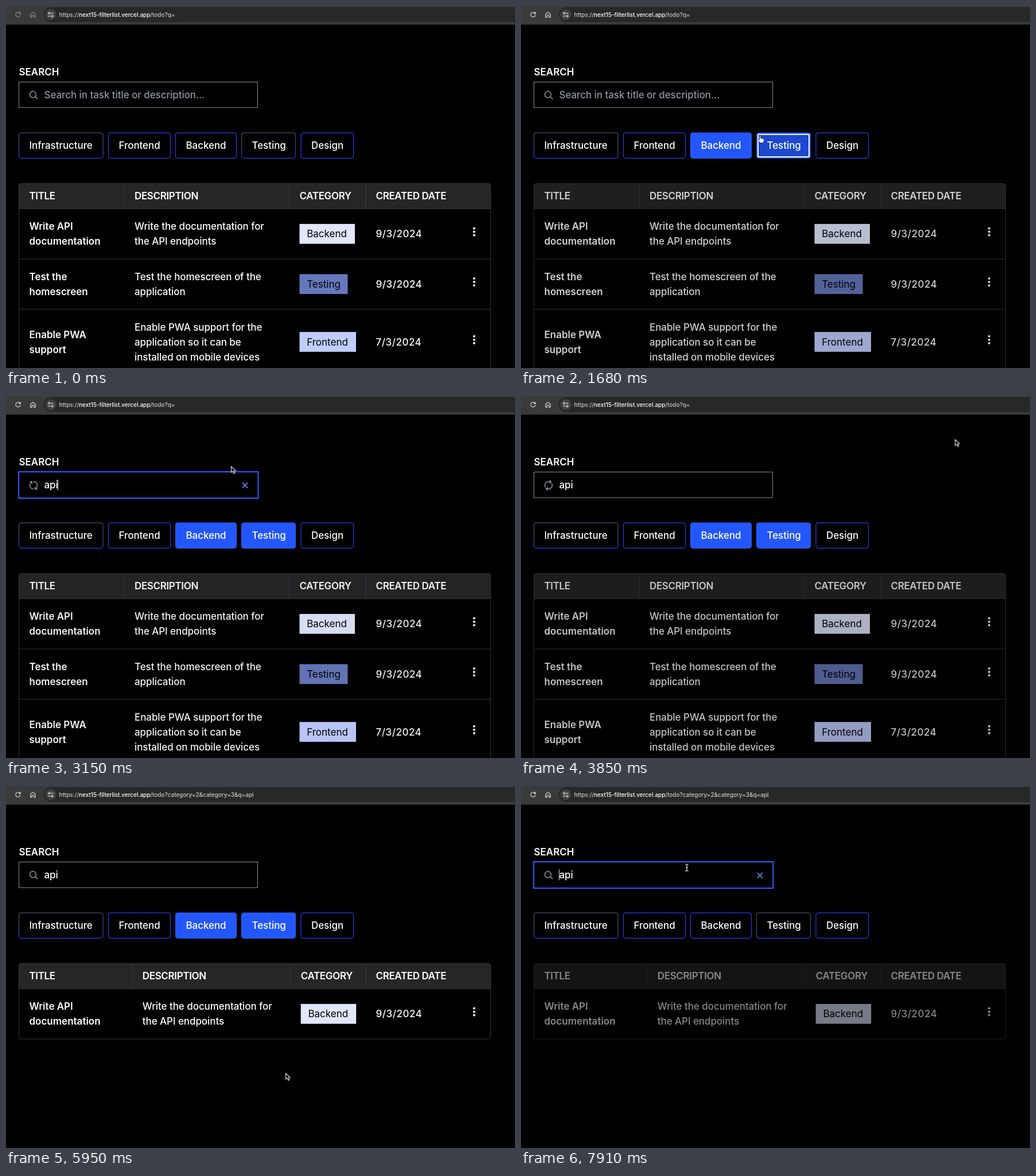
An HTML page for the animation above (8 s loop, 887x631 px).

```html
<!DOCTYPE html>
<html lang="en">
<head>
<meta charset="utf-8">
<title>Task list filter</title>
<style>
  html, body { margin: 0; width: 100%; height: 100%; overflow: hidden; background: #000; }
  svg { display: block; position: absolute; left: 0; top: 0; }
  text { font: 450 17px Inter, "Open Sans", sans-serif; letter-spacing: -.07px; fill: #fff; white-space: pre; }
  .bold { font-weight: 600; letter-spacing: 0; }
  .head { font-weight: 600; letter-spacing: -.35px; }
  .date { letter-spacing: .5px; }
  .dark { font-weight: 400; letter-spacing: 0; fill: #000; }
  .hint { fill: #8d96a3; }
  .url { font-size: 9.95px; letter-spacing: 0; fill: #c9c9c9; }
  .host { fill: #fff; font-weight: 500; }
  .line { fill: none; stroke-linecap: round; stroke-linejoin: round; }
</style>
</head>
<body>
<svg id="stage" width="887" height="631" viewBox="0 0 887 631"></svg>
<script>
const LOOP = 8000, FRAME = 70;
const BLUE = '#2457fb', BLUE_DARK = '#1d48d0', GRAY = '#374151';
const EDGE = '#2a3df0', EDGE_FADE = 'url(#fade)';

const text = (x, y, s, cls = '') => `<text x="${x}" y="${y}" class="${cls}">${s}</text>`;
const lines = (x, y, list, cls) => list.map((s, i) => text(x, y + i * 26, s, cls)).join('');
const rect = (x, y, w, h, attrs) => `<rect x="${x}" y="${y}" width="${w}" height="${h}" ${attrs}/>`;
const path = (d, attrs) => `<path d="${d}" class="line" ${attrs}/>`;

// label, left, width, border colour
const buttons = [
  ['Infrastructure', 22.5, 146.5, EDGE_FADE],
  ['Frontend', 178.5, 108, EDGE],
  ['Backend', 295.5, 106, EDGE],
  ['Testing', 410.5, 94, EDGE_FADE],
  ['Design', 514, 91.5, EDGE]
];
const BACKEND = 2, TESTING = 3;

const tasks = [
  { mid: 397, title: ['Write API', 'documentation'], about: ['Write the documentation for', 'the API endpoints'],
    tag: 'Backend', w: 96.5, fill: '#e0e7ff', date: '9/3/2024' },
  { mid: 484.5, title: ['Test the', 'homescreen'], about: ['Test the homescreen of the', 'application'],
    tag: 'Testing', w: 84, fill: '#6678bb', date: '9/3/2024' },
  { mid: 585.3, title: ['Enable PWA', 'support'],
    about: ['Enable PWA support for the', 'application so it can be', 'installed on mobile devices'],
    tag: 'Frontend', w: 98.5, fill: '#c0cdff', date: '7/3/2024' }
];

function taskRow(r, colAbout, colTag) {
  const top = list => r.mid + 6.2 - (list.length - 1) * 13;
  const dots = [-9.5, -3.5, 2.5].map(d => `<circle cx="815.8" cy="${r.mid + d}" r="2" fill="#fff"/>`).join('');
  return lines(40.5, top(r.title), r.title, 'bold') +
    lines(colAbout, top(r.about), r.about) +
    rect(colTag, r.mid - 17.1, r.w, 34.6, `fill="${r.fill}"`) +
    text(colTag + 12.7, r.mid + 6.2, r.tag, 'dark') +
    text(644.5, r.mid + 6.2, r.date, 'date') + dots;
}

function table(id, rows, colAbout, colTag, bottom) {
  const seps = [colAbout - 17.5, colTag - 18, 627]
    .map(x => path(`M${x} 310V353`, 'stroke="#2f3b48"')).join('');
  const rules = [353.5, 441, 528.5].filter(y => y < bottom)
    .map(y => path(`M23 ${y}H844`, 'stroke="#2f343c"')).join('');
  return `<g id="${id}">
    <path d="M22.5 353.5V313.5a4 4 0 0 1 4-4H840.5a4 4 0 0 1 4 4V353.5z" fill="#262626"/>
    ${seps}${rules}
    ${rect(22.5, 309.5, 822, bottom - 309.5, 'rx="4" fill="none" stroke="#363a40"')}
    ${text(40.5, 337, 'TITLE', 'head')}${text(colAbout, 337, 'DESCRIPTION', 'head')}
    ${text(colTag, 337, 'CATEGORY', 'head')}${text(644.5, 337, 'CREATED DATE', 'head')}
    ${rows.map(r => taskRow(r, colAbout, colTag)).join('')}</g>`;
}

const fade = `<linearGradient id="fade" x1="0" y1="0" x2="0" y2="1">
  <stop offset=".5" stop-color="#465072"/><stop offset="1" stop-color="${EDGE}"/></linearGradient>`;

const browserBar = `
  ${rect(0, 0, 887, 32.5, 'fill="#3a3a3b"')}
  ${rect(66, 2, 860, 26, 'rx="13" fill="#282828"')}
  <g id="nav" stroke-width="1.2">
    ${path('M24.4 12.6A4.1 4.1 0 1 0 25 16M25.2 10.6V13.3H22.5')}
    ${path('M42.8 14.2L47 10.6L51.2 14.2V19.6H48.6V16H45.4V19.6H42.8z')}
  </g>
  <circle cx="78" cy="15" r="9.5" fill="#424242"/>
  <g stroke="#ddd" stroke-width="1.2" fill="none">
    <path d="M78.6 12.6H82.6M73.4 17.6H77.4"/>
    <circle cx="75.4" cy="12.6" r="1.6"/><circle cx="80.6" cy="17.6" r="1.6"/>
  </g>
  <text x="92.5" y="18.7" class="url">https://<tspan class="host">next15-filterlist.vercel.app</tspan>/todo?<tspan id="query"></tspan></text>`;

const searchBox = `
  ${text(22.5, 121, 'SEARCH', 'bold')}
  <rect id="box" fill="none"/>
  ${path('M51 158.3L55 162', 'id="handle" stroke="#969ca6" stroke-width="1.4"')}
  <circle id="lens" cx="46.9" cy="154.3" r="5.5" fill="none" stroke="#969ca6" stroke-width="1.4"/>
  <g id="spinner"><g transform="translate(48 155.7) scale(.72) translate(-12 -12)" stroke="#969ca6" stroke-width="1.9">
    ${path('M3 12a9 9 0 0 1 9-9 9.75 9.75 0 0 1 6.74 2.74L21 8M21 3v5h-5')}
    ${path('M21 12a9 9 0 0 1-9 9 9.75 9.75 0 0 1-6.74-2.74L3 16M8 16H3v5')}
  </g></g>
  <text id="typed" x="66.5" y="160.7"></text>
  ${path('M0 146V164', 'id="caret" stroke="#ddd"')}
  ${path('M412.4 151.8L420.4 159.8M420.4 151.8L412.4 159.8', 'id="clear" stroke="#4a78cc" stroke-width="2.1"')}`;

const buttonRow = buttons.map(([label, x, w, border], i) =>
  rect(x, 221.1, w, 44.2, `id="btn${i}" rx="4" stroke="${border}" stroke-width="1.2"`) +
  rect(x + 2.5, 223.7, w - 5, 39.4, `id="ring${i}" rx="1.5" fill="none" stroke="#fff" stroke-width="2"`) +
  text(x + 18, 249, label)).join('');

const cursors = `<g id="cursor">
  <path id="arrow" d="M.6 .8V11.2L3 9.1L4.8 13.1L6.8 12.2L5 8.3H8.3z" fill="#000" stroke="#e8e8e8" stroke-width="1.1" stroke-linejoin="round"/>
  <path id="hand" d="M-1.6 1Q-.4-.6 .7 1V4.6Q2 3.8 2.7 5Q4.2 4.4 4.8 5.6Q6.6 5.2 6.6 7Q6.6 10 5.2 12.4H-.6Q-1.8 10-3.8 7.8Q-3.6 6-1.6 7.2z" fill="#fff" stroke="#111" stroke-width=".7" stroke-linejoin="round"/>
  <path id="beam" d="M-2.8-6Q-.4-6 0-4.2Q.4-6 2.8-6M0-4.2V4.6M-2.8 6.4Q-.4 6.4 0 4.6Q.4 6.4 2.8 6.4M-1.6 .2H1.6" fill="none" stroke="#e4e4e4" stroke-width="1.2"/>
</g>`;

document.getElementById('stage').innerHTML = fade + rect(0, 0, 887, 631, 'fill="#000"') + browserBar + searchBox +
  buttonRow + table('full', tasks, 224, 511.5, 660) + table('found', tasks.slice(0, 1), 237.8, 513.7, 441) + cursors;

const el = id => document.getElementById(id);
const show = (id, on) => { el(id).style.display = on ? '' : 'none'; };
const set = (id, attrs) => { for (const k in attrs) el(id).setAttribute(k, attrs[k]); };

// pointer stops: time, x, y
const route = [
  [70, 559, 571], [210, 450, 365], [350, 357, 222], [490, 357, 222], [770, 352, 276], [910, 352, 276],
  [1120, 350, 252], [1330, 352, 250], [1470, 420, 246], [1610, 424, 243], [1680, 417, 226],
  [1750, 398, 181], [1820, 380, 168], [1960, 372, 162], [3010, 372, 162], [3150, 392, 122],
  [3360, 520, 88], [3640, 742, 59], [3850, 756, 75], [5670, 756, 75], [5810, 640, 260], [5950, 487, 500],
  [6020, 487, 500], [6300, 501, 614], [6440, 490, 520], [6720, 452, 270], [6860, 446, 251],
  [7070, 440, 250], [7210, 412, 250], [7280, 384, 249], [7420, 366, 247], [7560, 335, 205],
  [7700, 289, 144], [7770, 289, 142]
];

function pointer(t) {
  const i = route.findIndex(p => p[0] > t);
  if (i < 0) return route[route.length - 1].slice(1);
  if (i === 0) return route[0].slice(1);
  const [t0, x0, y0] = route[i - 1], [t1, x1, y1] = route[i];
  const k = (t - t0) / (t1 - t0);
  return [x0 + (x1 - x0) * k, y0 + (y1 - y0) * k];
}

// cubic-bezier(.4, 0, .6, 1)
function ease(x) {
  let lo = 0, hi = 1;
  for (let i = 0; i < 20; i++) {
    const s = (lo + hi) / 2, r = 1 - s;
    if (1.2 * r * r * s + 1.8 * r * s * s + s * s * s < x) lo = s; else hi = s;
  }
  return lo * lo * (3 - 2 * lo);
}

function pulse(t, start) {
  if (t < start) return 1;
  const p = (t - start) / 1050 % 2;
  return 1 - ease(p < 1 ? p : 2 - p) / 2;
}

function draw(t) {
  const within = (a, b) => t >= a && t < b;
  const loaded = t >= 5320, active = t >= 630;
  const [x, y] = pointer(t);

  set('nav', { stroke: active ? '#d6d6d6' : '#858585' });
  el('query').textContent = loaded ? 'category=2&category=3&q=api' : 'q=';

  const focused = within(2030, 3850) || t >= 7770;
  set('box', focused
    ? { x: 22.1, y: 132.1, width: 417.4, height: 46, stroke: '#2857f4', 'stroke-width': 2.2 }
    : { x: 22.5, y: 132.5, width: 416, height: 44.6, stroke: '#8e8e8e', 'stroke-width': 1 });
  const count = Math.max(0, Math.min(3, Math.floor((t - 2380) / 140) + 1));
  el('typed').textContent = count ? 'api'.slice(0, count) : 'Search in task title or description...';
  set('typed', { class: count ? '' : 'hint' });
  const caretX = 66.5 + (t > 7000 ? 0 : [0, 9.6, 20, 24][count]);
  set('caret', { transform: `translate(${caretX} 0)` });
  show('caret', focused);
  show('clear', focused && count > 0);

  const busy = within(2380, 5320);
  show('spinner', busy);
  show('lens', !busy);
  show('handle', !busy);
  set('spinner', { transform: `rotate(${(t - 2360) / 1050 * 360} 48 155.7)` });

  let over = -1;
  buttons.forEach(([, left, w, border], i) => {
    const on = (i === BACKEND && within(1260, 7350)) || (i === TESTING && within(1540, 7040));
    const hover = t >= 910 && x >= left && x <= left + w && y >= 221 && y <= 265.5;
    const ring = (i === BACKEND && within(1260, 1540)) || (i === TESTING && within(1540, 2030));
    if (hover) over = i;
    set('btn' + i, {
      fill: on ? (hover ? BLUE_DARK : BLUE) : hover ? GRAY : '#000',
      stroke: on ? BLUE : border
    });
    show('ring' + i, ring);
  });

  show('full', !loaded);
  show('found', loaded);
  el('full').style.opacity = pulse(t, 1250);
  el('found').style.opacity = pulse(t, 7030);

  const inBox = x > 22 && x < 439 && y > 132 && y < 178;
  show('cursor', t >= 70 && !within(2380, 3080));
  show('beam', inBox);
  show('hand', over >= 0);
  show('arrow', !inBox && over < 0);
  set('cursor', { transform: `translate(${x} ${y})` });
}

const begin = performance.now();
function tick() {
  const t = (performance.now() - begin) % LOOP;
  draw(Math.min(Math.floor(t / FRAME) * FRAME, 7910));
  requestAnimationFrame(tick);
}
tick();
</script>
</body>
</html>
```
